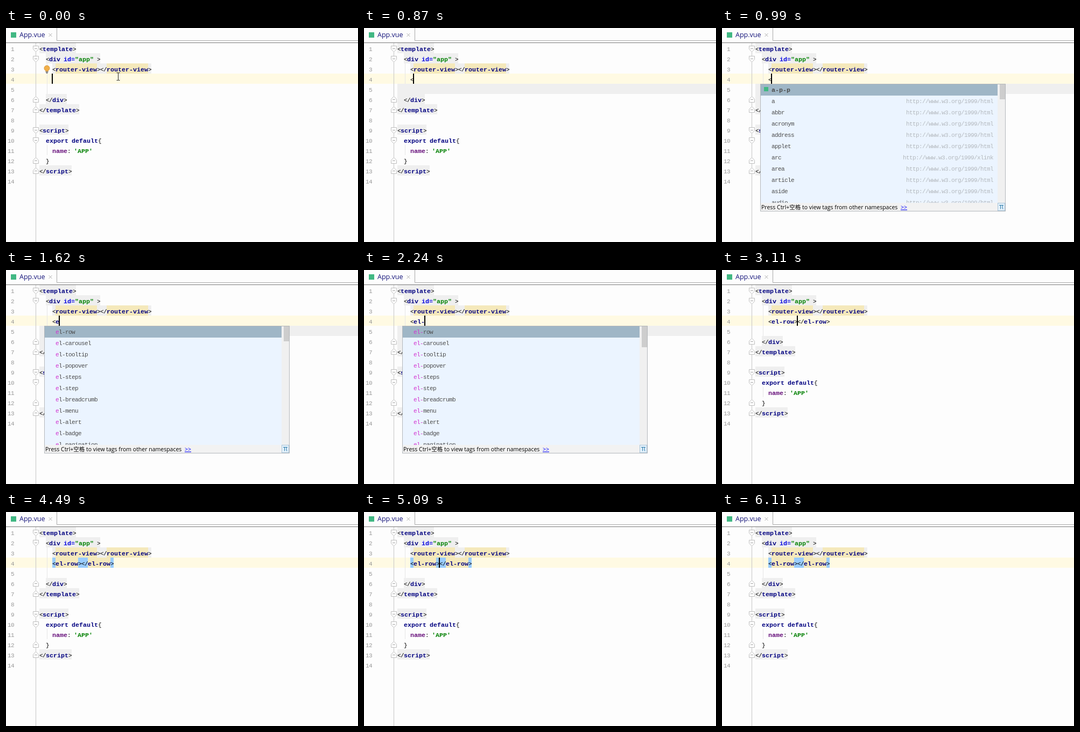
An HTML page for the animation above (6210 ms loop, 654 by 399 pixels).

```html
<!DOCTYPE html>
<html lang="en">
<head>
<meta charset="utf-8">
<title>Tag completion</title>
<style>
  html, body { margin: 0; width: 100%; height: 100%; overflow: hidden; background: #fdfdfd; }
  svg { display: block; width: 654px; height: 399px; }
  text { white-space: pre; font: 11px "Liberation Mono", "DejaVu Sans Mono", monospace; letter-spacing: -.6px; fill: #000; }
  .tag, .attr, .str, .prop, .bold { font-size: 11.67px; font-weight: bold; letter-spacing: 0; }
  .tag { fill: #000080; }
  .attr { fill: #0000e0; }
  .str { fill: #008000; }
  .prop { fill: #660e7a; }
  .bold, .item { fill: #4c4c4c; }
  .hit { fill: #d233d2; }
  .url { fill: #b4b9be; }
  .num { fill: #999; }
  .ui { font: 10.5px "Open Sans", "Noto Sans", "Noto Sans CJK SC", "Noto Sans CJK", sans-serif; letter-spacing: 0; }
  .title { font-size: 12.5px; fill: #101078; }
  .link { fill: #0000ff; text-decoration: underline; }
</style>
</head>
<body>
<svg viewBox="0 0 654 399">
  <g id="base"></g>
  <g id="live"></g>
</svg>
<script>
(() => {
  const LOOP = 6210;
  const WIDE = ['tag', 'attr', 'str', 'prop', 'bold'];
  const PAPER = '#fdfdfd', GREY = '#efefef', YELLOW = '#f5e9bb', BLUE = '#99ccff';

  const esc = s => s.replace(/&/g, '&amp;').replace(/</g, '&lt;').replace(/>/g, '&gt;');
  const rect = (x, y, w, h, fill) => `<rect x="${x}" y="${y}" width="${w}" height="${h}" fill="${fill}"/>`;
  const path = (d, stroke, fill = 'none') => `<path d="${d}" stroke="${stroke}" fill="${fill}"/>`;
  const text = (x, y, cls, s) => `<text x="${x}" y="${y}" class="${cls}">${esc(s)}</text>`;
  const rowTop = n => 28 + 19 * (n - 1);
  const band = (n, x, end, fill) => rect(x, rowTop(n), end - x, 19, fill);

  // Lays out [class, string] runs on a fixed grid: 7px for bold, 6px for plain.
  function runs(x, y, parts) {
    let out = '';
    for (const [cls, s] of parts) {
      out += text(x, y, cls, s);
      x += s.length * (WIDE.includes(cls) ? 7 : 6);
    }
    return out;
  }
  const code = (n, x, parts) => runs(x, rowTop(n) + 15, parts);
  const startTag = name => [['', '<'], ['tag', name], ['', '>']];
  const endTag = name => [['', '</'], ['tag', name], ['', '>']];

  function fold(n, up) {
    const y = rowTop(n) + 10.5, s = up ? -1 : 1;
    return path(`M50.5 ${y - 5 * s}h10v${6 * s}l-5 ${5 * s}l-5 ${-5 * s}z`, '#bdbdbd', '#fff') +
      path(`M53 ${y}h5`, '#a5a5a5');
  }

  function ibeam(x, y) {
    return path(`M${x - 3} ${y + .5}h2.5l.5 1l.5 -1h2.5M${x} ${y + 1}v13M${x - 3} ${y + 14.5}h2.5l.5 -1l.5 1h2.5`, '#222');
  }

  function bulb() {
    return '<circle cx="76" cy="75" r="5" fill="#f2b04a" stroke="#d99a3c"/>' +
      rect(73.5, 79, 5, 2, '#d9a14a') + rect(73.5, 81, 5, 1.5, '#777') + rect(74.5, 83, 3, 1.5, '#555');
  }

  function drawBase() {
    let out = rect(0, 0, 654, 399, PAPER) +
      path('M94.5 0V23.5H654', '#a8a8a8') + path('M0 27.5H654', '#777') +
      rect(9, 8, 10, 10, '#41b883') + text(25, 17, 'ui title', 'App.vue') +
      path('M79.5 10l6 6m0 -6l-6 6', '#b0b0b0') + band(4, 0, 654, '#fffae3');

    const greys = [[1, 62, 130], [2, 74, 175], [3, 86, 270], [6, 74, 113], [7, 62, 136], [9, 62, 116], [13, 62, 122]];
    out += greys.map(([n, a, b]) => band(n, a, b, GREY)).join('');
    out += band(3, 92, 169, YELLOW) + band(3, 187, 264, YELLOW);
    out += path('M76.5 66V123M76.5 218V237', '#e6e6e6') + path('M55.5 28V399', '#c6c6c6');

    for (let n = 1; n <= 14; n++) out += text(n < 10 ? 9 : 3, rowTop(n) + 15, 'num', String(n));
    out += [1, 2, 9, 10].map(n => fold(n)).join('') + [6, 7, 12, 13].map(n => fold(n, true)).join('');

    return out +
      code(1, 62, startTag('template')) +
      code(2, 74, [['', '<'], ['tag', 'div'], ['', ' '], ['attr', 'id='], ['str', '"app"'], ['', ' >']]) +
      code(3, 86, [...startTag('router-view'), ...endTag('router-view')]) +
      code(6, 74, endTag('div')) +
      code(7, 62, endTag('template')) +
      code(9, 62, startTag('script')) +
      code(10, 74, [['tag', 'export'], ['', ' '], ['tag', 'default'], ['', '{']]) +
      code(11, 86, [['prop', 'name'], ['', ': '], ['str', "'APP'"]]) +
      code(12, 74, [['', '}']]) +
      code(13, 62, endTag('script'));
  }

  const kitNames = s => s.split(' ').map(name => 'el-' + name);
  const HTML_TAGS = 'a-p-p a abbr acronym address applet arc area article aside audio'.split(' ');
  const KIT_TAGS = kitNames('row carousel tooltip popover steps step breadcrumb menu alert badge pagination');
  const R_TAGS = kitNames('row radio radio-button radio-group rate');

  function htmlItem(name, y) {
    if (name === 'a-p-p') return rect(78, 110, 8, 8, '#41b883') + text(92, y, 'bold', name);
    const url = 'http://www.w3.org/1999/' + (name === 'arc' ? 'xlink' : 'html');
    return text(92, y, 'item', name) + text(504 - 6 * url.length, y, 'url', url);
  }

  function popup({ list, hit, thumb }) {
    const foot = Math.min(105 + 21 * list.length, 326);
    const item = (name, i) => {
      const y = 119 + 21 * i;
      return hit ? runs(92, y, [['hit', name.slice(0, hit)], ['item', name.slice(hit)]]) : htmlItem(name, y);
    };
    return rect(71, 104, 456, foot - 88, '#b3b7bb') +
      rect(72, 105, 440, foot - 105, '#ebf4ff') +
      rect(72, 105, 440, 21, '#9fb6c6') +
      rect(512, 105, 14, foot - 105, thumb ? '#f0f0f0' : PAPER) +
      (thumb ? rect(516, 105, 10, thumb, '#cdcdcd') : '') +
      `<clipPath id="list"><rect x="72" y="105" width="440" height="${foot - 105}"/></clipPath>` +
      `<g clip-path="url(#list)">${list.map(item).join('')}</g>` +
      rect(72, foot, 454, 15, thumb ? '#f2f2f2' : PAPER) +
      text(73, foot + 11.5, 'ui', 'Press Ctrl+空格 to view tags from other namespaces') +
      text(332, foot + 11.5, 'ui link', '>>') +
      `<rect x="512.5" y="${foot + .5}" width="13" height="14" fill="#e4f1fb" stroke="#a9c4d8"/>` +
      path(`M515 ${foot + 4.5}h8M517.5 ${foot + 4.5}v7M521 ${foot + 4.5}v6q0 1 1.5 .5`, '#2878a8');
  }

  const html = { list: HTML_TAGS, thumb: 28 };
  const kit = (hit, thumb) => ({ list: KIT_TAGS, hit, thumb });
  const done = { closed: true, at: 140 };
  const marked = { ...done, tint: true, brackets: true };

  // [start in ms, state]
  const STEPS = [
    [0, { at: 86, caret: true, idle: true }],
    [370, { at: 86, idle: true }],
    [870, { at: 92, typed: '', caret: true }],
    [990, { at: 92, typed: '', caret: true, pop: html }],
    [1360, { at: 92, typed: '', pop: html }],
    [1620, { at: 99, typed: 'e', caret: true, pop: kit(1, 28) }],
    [1870, { at: 106, typed: 'el', caret: true, pop: kit(2, 36) }],
    [2240, { at: 113, typed: 'el-', caret: true, pop: kit(3, 39) }],
    [2490, { at: 120, typed: 'el-r', caret: true, pop: { list: R_TAGS, hit: 4 } }],
    [3110, { ...done, caret: true }],
    [3370, { ...done, tint: true, caret: true }],
    [3490, { ...marked, caret: true }],
    [4490, marked],
    [4610, { ...marked, mouse: 392 }],
    [4730, { ...marked, mouse: 384 }],
    [4850, { ...marked, mouse: 390 }],
    [4970, { ...marked, caret: true, mouse: 396 }],
    [5090, { ...marked, caret: true }],
    [5490, marked],
    [5990, { ...marked, caret: true }],
    [6110, marked]
  ];

  function drawState(s) {
    let out = '';
    if (s.idle) out += bulb() + ibeam(208.5, 83);
    if (s.typed !== undefined) {
      out += band(5, 62, 654, GREY) + band(6, 62, 74, GREY) +
        code(4, 86, [['', '<'], ['tag', s.typed]]);
    }
    if (s.tint) out += band(4, 92, 134, YELLOW) + band(4, 152, 194, YELLOW);
    if (s.brackets) out += band(4, 86, 92, BLUE) + band(4, 134, 152, BLUE) + band(4, 194, 200, BLUE);
    if (s.closed) out += code(4, 86, [...startTag('el-row'), ...endTag('el-row')]);
    if (s.pop) out += popup(s.pop);
    if (s.caret) out += rect(s.at - 1, 85, 2, 19, '#000');
    if (s.mouse) out += ibeam(532.5, s.mouse);
    return out;
  }

  const live = document.getElementById('live');
  document.getElementById('base').innerHTML = drawBase();
  let shown = null;

  function draw() {
    const t = performance.now() % LOOP;
    const step = STEPS.filter(([start]) => start <= t).pop();
    if (step !== shown) {
      live.innerHTML = drawState(step[1]);
      shown = step;
    }
    requestAnimationFrame(draw);
  }
  draw();
})();
</script>
</body>
</html>
```
